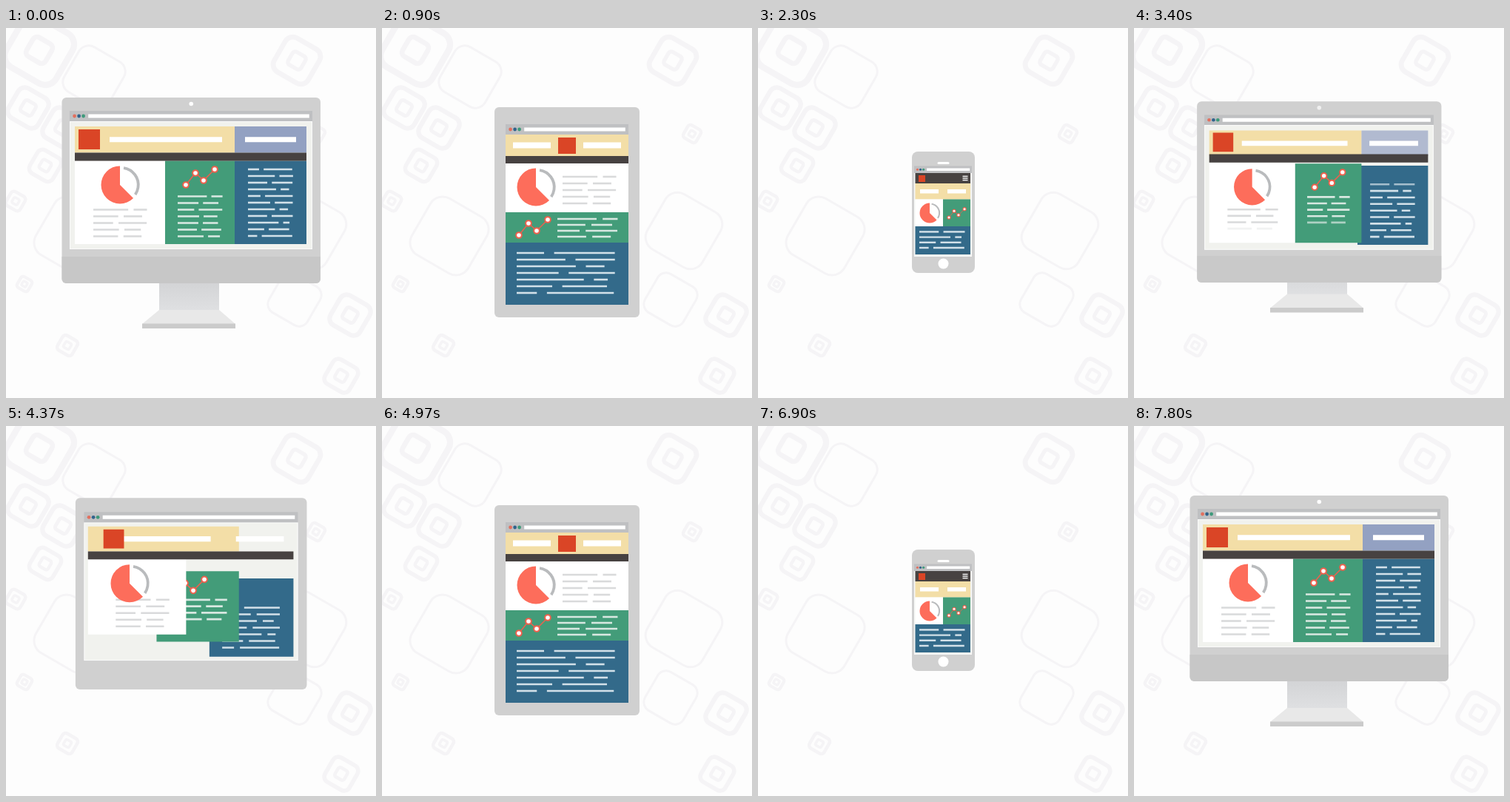
An HTML page with a canvas that plays this animation: 500x500 px, repeating every 7830 ms.

```html
<!DOCTYPE html>
<html lang="en">
<head>
<meta charset="utf-8">
<title>Responsive layout</title>
<style>
html, body { margin: 0; width: 100%; height: 100%; overflow: hidden; background: #fdfdfd; }
canvas { display: block; width: 100vw; height: 100vh; }
</style>
</head>
<body>
<canvas id="stage"></canvas>
<script>
const LOOP = 7830, CYCLE = 4150, MOVE = 570;
const canvas = document.getElementById('stage');
const ratio = Math.max(1, window.devicePixelRatio || 1);
canvas.width = canvas.height = 500 * ratio;
const c = canvas.getContext('2d');

// Cut a rectangle into stacked rows or side-by-side columns
const rows = ([x, y, w], ...sizes) => sizes.map(h => [x, (y += h) - h, w, h]);
const cols = ([x, y, , h], ...sizes) => sizes.map(w => [(x += w) - w, y, w, h]);

// text: [x, y] inside its panel, width, row step.
// snap: values that change in a short part of a move.
function desktop() {
  const [head, dark, main] = rows([93, 133, 313, 159], 35.5, 11, 112.5);
  const [yellow, slate] = cols(head, 216, 97);
  const [white, green, blue] = cols(main, 122, 94, 97);
  return {
    body: [75.5, 94, 349.5, 251], page: [86, 126, 328, 173], tabs: 14, radius: 6, phone: 0,
    yellow, slate, dark, white, green, blue,
    logo: [98, 137, 29, 27], bars: [[47, 152], [230, 69]], barHeight: 7,
    pie: [154, 212, 25.5], chart: [243, 212, 1],
    text: { white: [25, 66, 73, 9], green: [17, 48, 61, 9], blue: [18, 101.5, 62, -9] },
    snap: { desk: 1, white: 5, green: 7, blue: 11 }
  };
}

function tablet() {
  const page = [167, 144, 166, 230];
  const [yellow, dark, white, green, blue] = rows(page, 29, 10, 66, 41, 84);
  return {
    body: [152, 107, 196, 284], page, tabs: 14, radius: 6, phone: 0,
    yellow, slate: [333, 144, 0, 29], dark, white, green, blue,
    logo: [238, 148, 24, 22], bars: [[10, 51], [105, 51]], barHeight: 8,
    pie: [208, 215, 25.5], chart: [185, 280, 1],
    text: { white: [77, 18, 73, 9], green: [70, 9, 82, 8], blue: [15, 68, 136, -9] },
    snap: { desk: 0, white: 5, green: 4, blue: 7 }
  };
}

function mobile() {
  const [dark, yellow, middle, blue] = rows([212.5, 196, 74.5, 110], 14, 21.5, 36.5, 38);
  const [white, green] = cols(middle, 37.5, 37);
  return {
    body: [208, 167, 85, 164], page: [211, 196, 78, 113], tabs: 9.5, radius: 8, phone: 1,
    yellow, slate: [287, 210, 0, 21], dark, white, green, blue,
    logo: [217, 199, 9, 9], bars: [[6.5, 25], [43.5, 25]], barHeight: 5.5,
    pie: [232, 250, 13.5], chart: [258, 256, 0.54],
    text: { white: [20, 10, 15, 4], green: [10, 8, 20, 4], blue: [5.5, 29, 63, -7.2] },
    snap: { desk: 0, white: 0, green: 0, blue: 4 }
  };
}

const D = desktop(), T = tablet(), P = mobile();
const moves = [
  { at: 35, from: D, to: T },
  { at: 1440, from: T, to: P },
  { at: 2930, from: P, to: D }
];

const clamp = v => Math.max(0, Math.min(1, v));

// Blend numbers, arrays and nested objects alike
function mix(a, b, k) {
  if (typeof a === 'number') return a + (b - a) * k;
  if (Array.isArray(a)) return a.map((v, i) => mix(v, b[i], k));
  return Object.fromEntries(Object.keys(a).map(key => [key, mix(a[key], b[key], k)]));
}

function poseAt(u) {
  const move = moves.filter(m => u >= m.at).pop();
  if (!move) return D;
  const { from, to, at } = move;
  const e = (1 - Math.cos(Math.PI * clamp((u - at) / MOVE))) / 2;
  const early = clamp(e * 4.5), late = clamp(e * 4.5 - 3.5);
  return { ...mix(from, to, e), snap: mix(from.snap, to.snap, to === D ? late : early) };
}

function rect([x, y, w, h], fill, r = 0) {
  c.fillStyle = fill;
  c.beginPath();
  c.roundRect(x, y, w, h, r);
  c.fill();
}

function disc(x, y, r, fill) {
  c.fillStyle = fill;
  c.beginPath();
  c.arc(x, y, r, 0, 7);
  c.fill();
}

function faded(alpha, draw) {
  if (alpha <= 0.01) return;
  c.globalAlpha = alpha;
  draw();
  c.globalAlpha = 1;
}

// Backdrop squares: x, y, size
const rings = [[45, 30, 78], [30, 108, 46], [77, 135, 46], [53, 186, 36], [13, 234, 22], [393, 44, 53],
  [419, 143, 20], [465, 388, 46], [25, 346, 17], [83, 429, 23], [453, 470, 38]];
const outlines = [[119, 66, 70], [91, 281, 88], [408, 274, 86], [390, 367, 60]];

function tile(x, y, size, line) {
  c.save();
  c.translate(x, y);
  c.rotate(Math.PI / 6);
  c.lineWidth = line;
  c.beginPath();
  c.roundRect(-size / 2, -size / 2, size, size, size * 0.22);
  c.stroke();
  c.restore();
}

function backdrop() {
  c.fillStyle = '#fdfdfd';
  c.fillRect(0, 0, 500, 500);
  c.strokeStyle = '#f5f4f6';
  for (const [x, y, size] of rings) {
    const line = 3 + size * 0.07;
    tile(x, y, size, line);
    tile(x, y, size * 0.38, line * 0.8);
  }
  outlines.forEach(o => tile(...o, 3));
}

function stand(shown) {
  if (shown < 0.01) return;
  c.save();
  c.translate(0, 66 * (shown - 1));
  const neck = c.createLinearGradient(0, 345, 0, 382);
  neck.addColorStop(0, '#d3d4d6');
  neck.addColorStop(1, '#dfe0e2');
  rect([207, 335, 81, 47], neck);
  c.fillStyle = '#e8e8e8';
  c.beginPath();
  c.moveTo(207, 381);
  c.lineTo(288, 381);
  c.lineTo(310, 400);
  c.lineTo(184, 400);
  c.fill();
  rect([184, 399.5, 126, 6.5], '#cbcbcb');
  c.restore();
}

function drawBody({ body, radius, phone, snap }) {
  const [x, y, w, h] = body;
  const mid = x + w / 2;
  rect(body, '#d0d0d0', radius);
  faded(snap.desk, () => {
    rect([x, y + h - 36, w, 36], '#c7c7c7', [0, 0, radius, radius]);
    disc(mid, y + 8.5, 2.8, '#ffffff');
  });
  faded(phone ** 3, () => {
    rect([mid - 8, y + 14, 16, 3], '#ffffff', 1.5);
    disc(mid, y + h - 12.5, 7, '#ffffff');
  });
}

function drawBrowser({ page, tabs }) {
  const [x, y, w] = page;
  const mid = y - tabs / 2;
  rect(page, '#f1f2ee');
  c.strokeStyle = '#fafafa';
  c.lineWidth = 1;
  c.strokeRect(x + 0.5, y + 0.5, w - 1, page[3] - 1);
  rect([x, y - tabs, w, tabs], '#bfc0c2');
  rect([x + tabs * 1.8, mid - tabs * 0.18, w - tabs * 2.1, tabs * 0.36], '#ffffff');
  ['#e2705f', '#31638c', '#3f9a7b'].forEach((fill, i) =>
    disc(x + tabs * (0.47 + 0.43 * i), mid, tabs * 0.17, fill));
}

function drawPie([x, y, r]) {
  c.fillStyle = '#fd6d5b';
  c.beginPath();
  c.moveTo(x, y);
  c.arc(x, y, r, Math.PI * 0.25, Math.PI * 1.5);
  c.fill();
  c.strokeStyle = '#b9bbbd';
  c.lineWidth = r * 0.15;
  c.beginPath();
  c.arc(x + r * 0.06, y, r * 0.91, -1.42, 0.6);
  c.stroke();
}

function drawChart([x, y, s]) {
  const points = [[0, 0], [13, -16], [24, -6], [39, -21]].map(([a, b]) => [x + a * s, y + b * s]);
  c.strokeStyle = '#e8624f';
  c.lineWidth = 1.6 * s;
  c.beginPath();
  points.forEach(p => c.lineTo(...p));
  c.stroke();
  for (const p of points) {
    disc(...p, 4.8 * s, '#f0604d');
    disc(...p, 2.8 * s, '#ffffff');
  }
}

function random(seed) {
  const v = Math.sin(seed * 12.9898) * 43758.5453;
  return v - Math.floor(v);
}

// Each row is two dashes with a gap at a seeded place
function drawText(pose, name, ink) {
  const [left, top] = pose[name];
  const [dx, dy, w, step] = pose.text[name];
  const count = pose.snap[name];
  const h = Math.min(2.6, Math.abs(step) * 0.34);
  for (let i = 0; i < count; i++) {
    const seed = i * 2 + name.length * 31;
    const gap = 0.2 + 0.5 * random(seed);
    const end = 0.87 + 0.13 * random(seed + 1);
    const x = left + dx, y = top + dy + i * step - h / 2;
    faded(clamp(count - i), () => {
      rect([x, y, gap * w, h], ink);
      rect([x + (gap + 0.1) * w, y, (end - gap - 0.1) * w, h], ink);
    });
  }
}

function drawPage(pose) {
  const { page, yellow, dark, phone, snap } = pose;
  c.save();
  c.beginPath();
  c.rect(...page);
  c.clip();
  rect(yellow, '#f3dea7');
  faded(snap.desk, () => rect(pose.slate, '#93a1c2'));
  for (const [dx, w] of pose.bars) {
    rect([yellow[0] + dx, yellow[1] + (yellow[3] - pose.barHeight) / 2, w, pose.barHeight], '#ffffff');
  }
  rect(pose.blue, '#336a8a');
  drawText(pose, 'blue', '#d3e1e9');
  rect(pose.green, '#439c79');
  drawText(pose, 'green', '#d8e8e1');
  drawChart(pose.chart);
  rect(pose.white, '#ffffff');
  drawText(pose, 'white', '#d9dadb');
  drawPie(pose.pie);
  rect(dark, '#474241');
  rect(pose.logo, '#da4526');
  faded(phone ** 3, () => {
    for (let i = -1; i <= 1; i++) {
      rect([dark[0] + dark[2] - 10.5, dark[1] + 6.3 + i * 2.6, 7, 1.4], '#ffffff');
    }
  });
  c.restore();
}

const begin = performance.now();
function frame() {
  const t = (performance.now() - begin) % LOOP;
  const pose = poseAt(t % CYCLE);
  c.setTransform(ratio, 0, 0, ratio, 0, 0);
  backdrop();
  stand(pose.snap.desk);
  drawBody(pose);
  drawBrowser(pose);
  drawPage(pose);
  requestAnimationFrame(frame);
}
frame();
</script>
</body>
</html>
```
